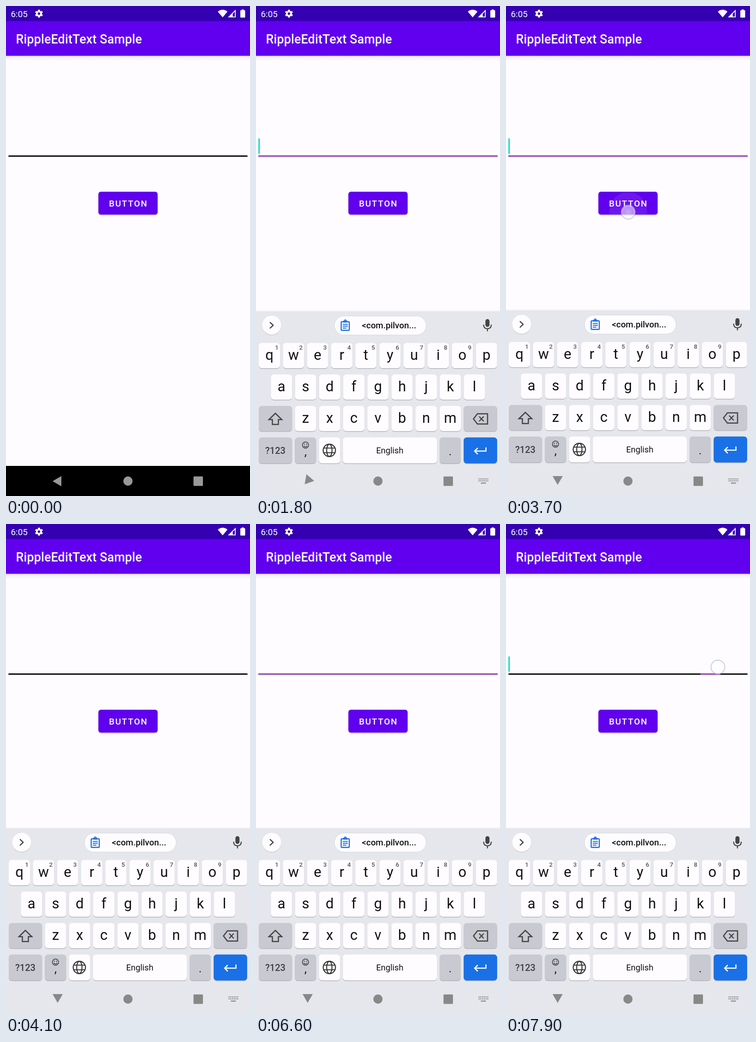
These frames come from a looping animation (529 px wide and 1058 px high, 8 s). An HTML page:

```html
<!DOCTYPE html>
<html lang="en">
<head>
<meta charset="utf-8">
<title>RippleEditText Sample</title>
<style>
html, body { margin: 0; width: 100%; height: 100%; overflow: hidden; background: #fefcff; }
svg { display: block; width: 100vw; height: 100vh; }
text { font-family: Roboto, sans-serif; }
.mid { text-anchor: middle; }
.medium { font-weight: 500; }
.line { fill: none; stroke-linejoin: round; stroke-linecap: round; }
#back { transform-origin: 110.5px 1024.5px; }
</style>
</head>
<body>
<svg id="stage" viewBox="0 0 529 1058">
  <defs>
    <linearGradient id="barShade" x2="0" y2="1">
      <stop offset="0" stop-color="#000" stop-opacity=".13"/>
      <stop offset=".4" stop-color="#000" stop-opacity=".04"/>
      <stop offset="1" stop-color="#000" stop-opacity="0"/>
    </linearGradient>
    <radialGradient id="touchFill">
      <stop offset="0" stop-color="#fff" stop-opacity=".62"/>
      <stop offset=".7" stop-color="#fff" stop-opacity=".52"/>
      <stop offset="1" stop-color="#fff" stop-opacity=".66"/>
    </radialGradient>
    <filter id="soft" x="-20%" y="-30%" width="140%" height="170%"><feGaussianBlur stdDeviation="1.7"/></filter>
    <clipPath id="buttonClip"><rect x="200.3" y="401" width="128.4" height="49.2" rx="5.2"/></clipPath>
  </defs>

  <rect width="529" height="1058" fill="#fefcff"/>

  <!-- app bar -->
  <rect y="107" width="529" height="12" fill="url(#barShade)"/>
  <rect width="529" height="107.5" fill="#6000ee"/>
  <rect width="529" height="32.5" fill="#3400b1"/>
  <text class="medium" x="21.5" y="80.5" font-size="26.94" letter-spacing=".1" fill="#fff">RippleEditText Sample</text>

  <!-- status bar -->
  <g fill="#fff">
    <text x="10.5" y="23.5" font-size="18.86">6:05</text>
    <g id="gear" transform="translate(71.5 16.5)">
      <circle r="4.6" fill="none" stroke="#fff" stroke-width="3.8"/>
    </g>
    <path d="M459.3 12.2Q469.7 4 480.1 12.2L469.7 24.6Z"/>
    <path fill-rule="evenodd" d="M481 24.5L498 7.800V24.5ZM491.500 16.800V22.700H496.200V12.200Z"/>
    <path d="M511 9V7.500H515.500V9H517Q518.500 9 518.500 10.500V23.500Q518.500 25 517 25H509.500Q508 25 508 23.500V10.500Q508 9 509.500 9Z"/>
  </g>

  <!-- text field -->
  <rect x="5.3" y="322.6" width="518.3" height="2.900" fill="#000"/>
  <rect id="accent" y="322.6" width="1" height="2.900" fill="#aa5ccb"/>
  <rect id="cursor" x="5.300" y="286" width="2.800" height="33" fill="#05d6c7"/>

  <!-- button -->
  <rect x="201" y="403.500" width="127" height="48" rx="5" fill="#000" opacity=".36" filter="url(#soft)"/>
  <rect x="200.300" y="401" width="128.400" height="49.200" rx="5.200" fill="#6000ee"/>
  <g clip-path="url(#buttonClip)"><g id="ripplePlace"><circle id="ripple" r="1" fill="#fff"/></g></g>
  <text class="medium" x="223.300" y="433" font-size="18.86" letter-spacing="1.8" fill="#fff">BUTTON</text>

  <!-- keyboard and navigation -->
  <rect id="navBar" y="993" width="529" height="65" fill="#000"/>
  <g id="keyboard">
    <rect y="655.500" width="529" height="3" fill="#f3f2f6"/>
    <rect y="657.500" width="529" height="401" fill="#e5e7ec"/>
    <circle cx="34" cy="688.500" r="20.500" fill="#c4c6cb"/>
    <circle cx="34" cy="687.300" r="20.500" fill="#fefcff"/>
    <path class="line" d="M30.800 681.300L37.200 687.300L30.800 693.300" stroke="#444" stroke-width="2.500"/>
    <rect x="170" y="667.300" width="199" height="41" rx="20.500" fill="#fefcff" stroke="#d5d7dc"/>
    <g fill="none" stroke="#1a6fe6" stroke-width="2.400">
      <rect x="184.700" y="679.700" width="17.500" height="18.500" rx="1.500"/>
      <path d="M188 685.500H199M188 689.500H199M188 693.500H196" stroke-width="2"/>
      <path d="M189 679.500H198" stroke-width="4"/>
      <circle cx="193.500" cy="677.500" r="1.800" stroke-width="1.800"/>
    </g>
    <text class="medium" x="229.500" y="694" font-size="18.800" fill="#111">&lt;com.pilvon...</text>
    <g class="line" stroke="#444" stroke-width="2.300">
      <rect x="498.500" y="675.200" width="6.600" height="14.500" rx="3.300" fill="#444"/>
      <path d="M493.500 687Q494 694.800 501.800 694.800T510 687M501.800 695V699.500"/>
    </g>
    <g id="keys"></g>
    <g class="line" stroke="#444" stroke-width="2.500" style="stroke-linejoin:miter">
      <path d="M42 877.500L28 891H35.500V901.500H48.500V891H56Z"/>
      <path d="M480 878.500H502V900.500H480L471.500 889.500ZM484.500 885L493 894M493 885L484.500 894"/>
      <path d="M498.500 952V959H474.500M480 953L474 959L480 965" stroke="#fff"/>
    </g>
    <g fill="none" stroke="#333" stroke-width="2.200">
      <circle cx="159" cy="957.500" r="13.300"/>
      <ellipse cx="159" cy="957.500" rx="5.800" ry="13.300"/>
      <path d="M147 952.500H171M147 962.500H171"/>
    </g>
    <g fill="none" stroke="#333" stroke-width="1.400">
      <circle cx="107.300" cy="946" r="6.800"/>
      <path d="M103.500 947.500Q107.300 953 111.100 947.500"/>
      <path d="M104.800 943V945M109.800 943V945" stroke-width="1.900"/>
    </g>
  </g>
  <g id="nav" fill="#999">
    <path id="back" d="M101 1026L120 1015V1037Z"/>
    <circle cx="264.400" cy="1025.800" r="10"/>
    <rect x="406.500" y="1015.800" width="20.500" height="20.500" rx="1.500"/>
    <g id="imeIcon"><rect x="487.500" y="1029" width="11" height="2.200"/></g>
  </g>

  <g id="touch">
    <circle r="15" fill="url(#touchFill)" stroke="#a9a9d4" stroke-opacity=".62" stroke-width="2"/>
  </g>
</svg>
<script>
const LOOP = 8000;
const byId = id => document.getElementById(id);

function add(parent, tag, attrs, label) {
  const node = document.createElementNS('http://www.w3.org/2000/svg', tag);
  for (const name in attrs) node.setAttribute(name, attrs[name]);
  if (label) node.textContent = label;
  parent.append(node);
  return node;
}

// Icons made of repeated parts
for (let i = 0; i < 6; i++)
  add(byId('gear'), 'rect', { x: -2.1, y: -8.6, width: 4.2, height: 4, rx: .6, transform: `rotate(${i * 60})` });
for (let i = 0; i < 12; i++)
  add(byId('imeIcon'), 'rect', { x: 482.5 + i % 6 * 3.75, y: 1020 + Math.floor(i / 6) * 4.2, width: 2.3, height: 2.3 });

// Keys
const keys = byId('keys');
const PITCH = 52.3;
function key(x, y, width, fill, height = 54.5) {
  add(keys, 'rect', { x, y: y + 1.4, width, height, rx: 6.5, fill: '#b4b6bc' });
  add(keys, 'rect', { x, y, width, height, rx: 6.5, fill });
}
function label(x, y, size, text, fill = '#111', cls = 'mid') {
  add(keys, 'text', { x, y, 'font-size': size, fill, class: cls }, text);
}
[['qwertyuiop', 6], ['asdfghjkl', 32.2], ['zxcvbnm', 84.4]].forEach(([letters, left], row) => {
  const y = 725.5 + row * 68;
  [...letters].forEach((letter, i) => {
    const x = left + i * PITCH;
    key(x, y, 46, '#fefcff');
    label(x + 23, y + 36.5, 31, letter);
    if (!row) label(x + 39, y + 14.5, 13.5, (i + 1) % 10, '#555', 'mid medium');
  });
});
const GRAY = '#c9cad1', WHITE = '#fefcff';
key(6, 861.5, 72.3, GRAY);
key(450.2, 861.5, 72.6, GRAY);
[[6, 72.3, GRAY], [84.4, 46, GRAY], [136.5, 46, WHITE], [188.3, 203.7, WHITE], [398, 46, GRAY], [450.2, 72.6, '#1a70e6']]
  .forEach(([x, width, fill]) => key(x, 929.5, width, fill, 56));
label(42, 965, 20, '?123', '#3c3d42', 'mid medium');
label(107.5, 969, 25, ',');
label(290, 964, 18.3, 'English');
label(421, 968, 23, '.');

// Motion: each track is a list of [ms, value], held until the next entry
function track(id, prop, steps) {
  const frames = steps.map(([ms, value]) => ({ offset: ms / LOOP, [prop]: value, easing: 'step-end' }));
  frames.push({ offset: 1, [prop]: steps[steps.length - 1][1] });
  byId(id).animate(frames, { duration: LOOP, iterations: Infinity });
}
const at = (x, y) => `translate(${x}px, ${y}px)`;

const LEFT = 5.3, RIGHT = 523.6, CENTER = (LEFT + RIGHT) / 2;
function spread(part, x = CENTER) {
  const start = x - (x - LEFT) * part;
  return `translate(${start}px, 0px) scale(${(RIGHT - LEFT) * part}, 1)`;
}
const grow = (ms, x) => [.08, .33, .58, .83, 1].map((part, i) => [ms + i * 100, spread(part, x)]);
const shrink = ms => [.75, .5, .25, 0].map((part, i) => [ms + i * 100, spread(part)]);

track('accent', 'transform', [
  [0, spread(0)], [1400, spread(.06, 271)], [1600, spread(.29, 271)], [1700, spread(.54, 271)], [1800, spread(1)],
  ...shrink(3800), ...grow(5100, 265), ...shrink(6900), [7900, spread(.083, 459)]
]);
track('cursor', 'opacity', [
  [0, 0], [1400, 1], [1900, 0], [2400, 1], [2900, 0], [3400, 1], [3800, 0],
  [5100, 1], [5600, 0], [6100, 1], [6600, 0], [7900, 1]
]);

track('touch', 'transform', [
  [0, at(271, 305)], [3600, at(265, 445)], [5100, at(265, 305)], [6700, at(271, 425)], [7900, at(459.4, 309)]
]);
track('touch', 'opacity', [
  [0, 0], [1400, 1], [1600, .5], [1700, .15], [1800, 0], [3600, 1], [3800, .45], [3900, 0],
  [5100, 1], [5200, .6], [5300, .2], [5400, 0], [6700, 1], [6900, .45], [7000, 0], [7900, 1]
]);

const press = (ms, values) => values.map((value, i) => [ms + i * 100, value]);
const sizes = [20, 41, 140].map(r => `scale(${r})`);
const fades = [.05, .09, .22, .15, .07, 0];
track('ripplePlace', 'transform', [[0, at(265, 443)], [6700, at(271, 425)]]);
track('ripple', 'transform', [[0, sizes[0]], ...press(3600, sizes), ...press(6700, sizes)]);
track('ripple', 'opacity', [[0, 0], ...press(3600, fades), ...press(6700, fades)]);

track('keyboard', 'visibility', [[0, 'hidden'], [1800, 'visible']]);
track('keyboard', 'transform', [[0, at(0, 2)], [1900, at(0, 0)]]);
track('imeIcon', 'opacity', [[0, 0], [1600, 1]]);
track('nav', 'fill', [[0, '#999'], [1800, '#888']]);
track('back', 'transform', [[0, 'rotate(0deg)'], [1800, 'rotate(-50deg)'], [1900, 'rotate(-86deg)'], [2000, 'rotate(-90deg)']]);
</script>
</body>
</html>
```
